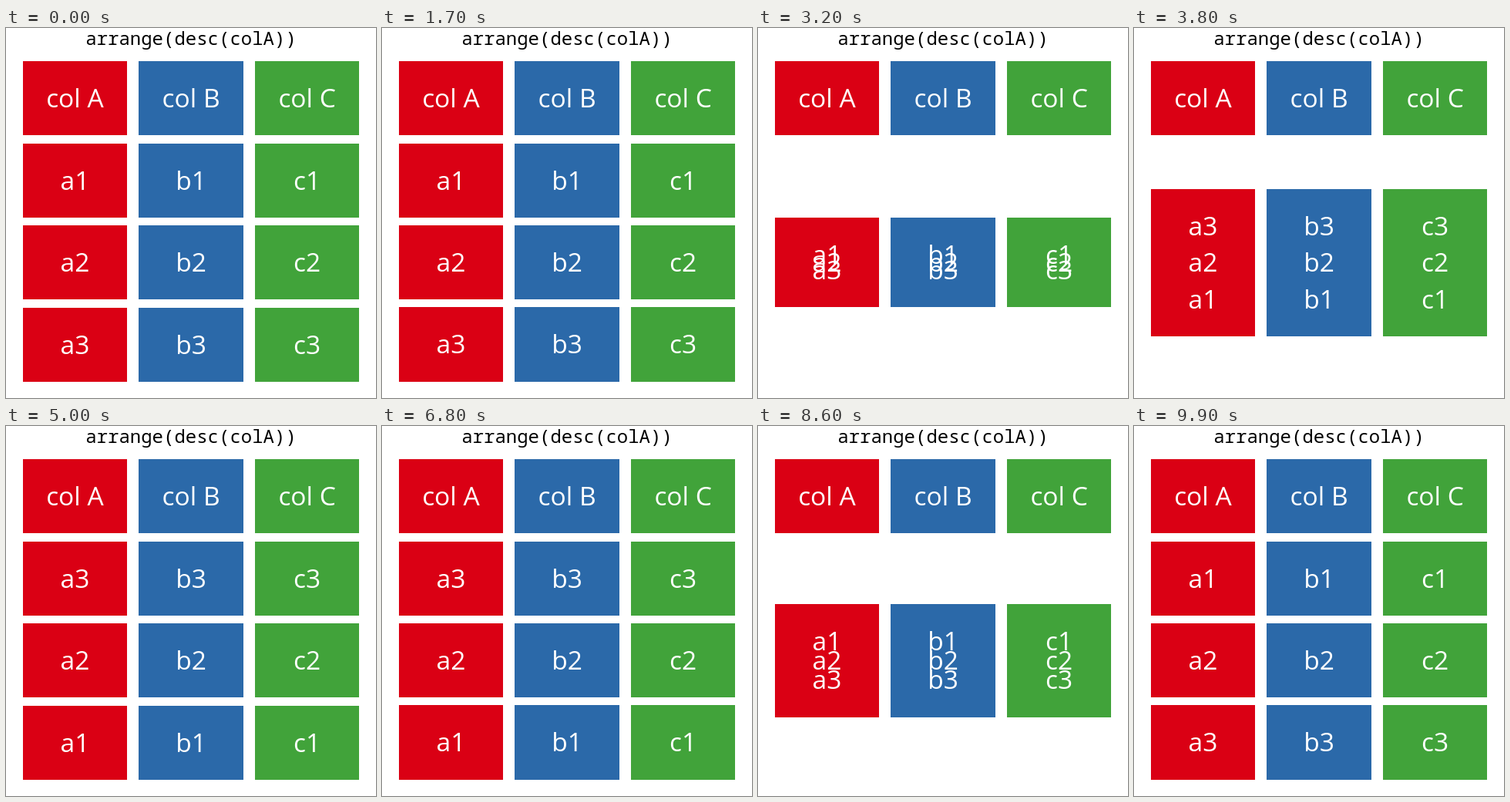
Write an HTML page with a canvas that moves like this. It is 480 px wide and 480 px high and loops after 10 s.

```html
<!DOCTYPE html>
<html lang="en">
<head>
<meta charset="utf-8">
<title>Sorting rows</title>
<style>
html, body { margin: 0; width: 100%; height: 100%; overflow: hidden; background: #fff; }
canvas { display: block; width: 480px; height: 480px; }
</style>
</head>
<body>
<canvas id="stage" width="480" height="480"></canvas>
<script>
const ctx = document.getElementById('stage').getContext('2d');
const LOOP = 10000, STEP = 100;
const MID_X = 240.05, MID_Y = 304.3;
const PITCH_X = 150.6, PITCH_Y = 106.6;
const HALF_W = 67.8, HALF_H = 48.1;
const COLUMNS = [['A', '#da0014'], ['B', '#2b69a9'], ['C', '#41a33a']];

// Sine ease in and out, from 0 to 1
function ease(t, start, end) {
  const p = Math.min(1, Math.max(0, (t - start) / (end - start)));
  return (1 - Math.cos(Math.PI * p)) / 2;
}

function tile(x, y, color) {
  const left = Math.round(x - HALF_W), top = Math.round(y - HALF_H);
  ctx.fillStyle = color;
  ctx.fillRect(left, top, Math.round(x + HALF_W) - left, Math.round(y + HALF_H) - top);
}

function label(text, x, baseline, font, color) {
  ctx.font = font;
  ctx.fillStyle = color;
  ctx.fillText(text, x, Math.round(baseline));
}

function draw(now) {
  const t = Math.floor(now % LOOP / STEP) * STEP;
  const swap = ease(t, 1600, 5000) - ease(t, 6700, 10000);
  const offset = PITCH_Y * (1 - 2 * swap);
  const rows = [-2 * PITCH_Y, -offset, 0, offset].map(dy => MID_Y + dy);

  ctx.fillStyle = '#fff';
  ctx.fillRect(0, 0, 480, 480);
  ctx.textAlign = 'center';
  label('arrange(desc(colA))', 240, 22, '24px "Noto Sans Mono", monospace', '#000');

  COLUMNS.forEach(([name, color], i) => {
    const x = MID_X + (i - 1) * PITCH_X;
    rows.forEach(y => tile(x, y, color));
    rows.forEach((y, r) => {
      const text = r ? name.toLowerCase() + r : 'col ' + name;
      label(text, x, y + 12, '33.5px "Open Sans", "Noto Sans", sans-serif', '#fff');
    });
  });
}

const began = performance.now();
function tick() {
  draw(performance.now() - began);
  requestAnimationFrame(tick);
}
tick();
</script>
</body>
</html>
```
